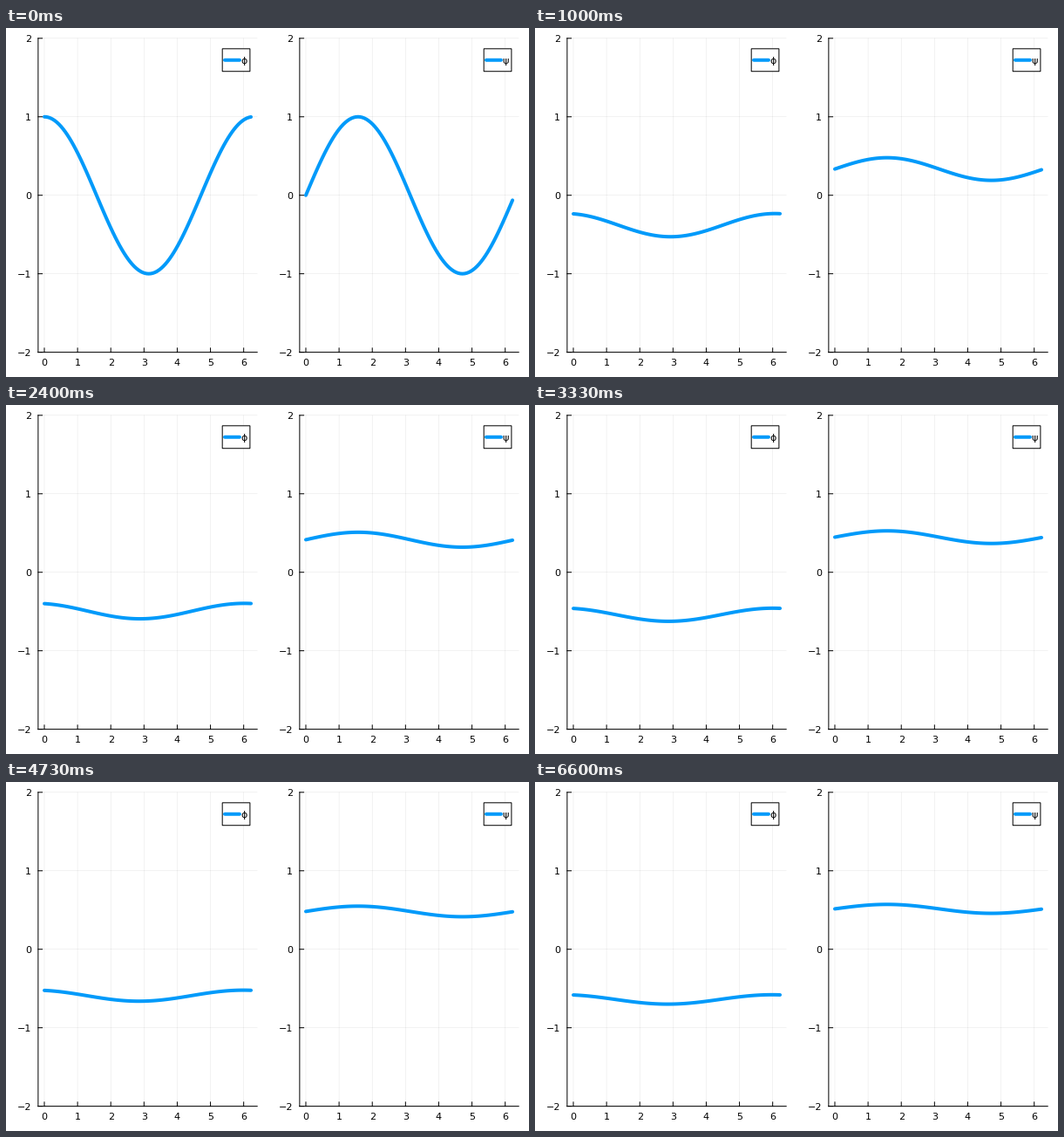
A matplotlib script for the animation above (6670 ms loop, 600 by 400 pixels).

```python
import numpy as np
import matplotlib.pyplot as plt
from matplotlib.animation import FuncAnimation
from matplotlib.patches import Rectangle

W, H, DPI = 600, 400, 100
PT = 72 / DPI  # points per pixel
FRAMES, LOOP_MS = 100, 6670
BLUE = "#009AFA"
TOP, BOTTOM, PANEL_W = 11.81, 371.61, 251.32
TICK = 4.72

plt.rcParams["font.family"] = "DejaVu Sans"
fig = plt.figure(figsize=(W / DPI, H / DPI), dpi=DPI, facecolor="white")
ax = fig.add_axes([0, 0, 1, 1])
ax.set_xlim(0, W)
ax.set_ylim(H, 0)
ax.axis("off")

x = np.arange(100) * 2 * np.pi / 100
PAD = 0.03 * x[-1]


def px(left, v):
    return left + PANEL_W * (v + PAD) / (x[-1] + 2 * PAD)


def py(v):
    return BOTTOM + (TOP - BOTTOM) * (v + 2) / 4


def line(xs, ys, width=1, **kw):
    kw.setdefault("color", "black")
    return ax.plot(xs, ys, lw=width * PT, snap=False, **kw)[0]


def label(tx, ty, s, ha):
    ax.text(tx, ty, s, fontsize=8, ha=ha, va="baseline")


def panel(left, name):
    """Draw axes, grid and legend; return the empty curve."""
    right = left + PANEL_W
    grid = dict(width=0.5, alpha=0.1, zorder=1)
    for v in range(7):
        gx = px(left, v)
        line([gx, gx], [TOP, BOTTOM], **grid)
        line([gx, gx], [BOTTOM, BOTTOM - TICK])
        label(gx, 387, str(v), "center")
    for v in range(-2, 3):
        gy = py(v)
        line([left, right], [gy, gy], **grid)
        line([left, left + TICK], [gy, gy])
        label(left - 8, gy + 4.2, str(v).replace("-", "\u2212"), "right")
    line([left, left], [TOP, BOTTOM])
    line([left, right], [BOTTOM, BOTTOM])

    ax.add_patch(Rectangle((right - 40, 23.8), 31.7, 25.92, fc="white",
                           ec="black", lw=PT, snap=False, zorder=4))
    line([right - 37.2, right - 20.2], [36.76, 36.76], 4, color=BLUE,
         solid_capstyle="round", zorder=5)
    ax.text(right - 18.4, 40.9, name, fontsize=8, va="baseline", zorder=6)
    return line([], [], 4, color=BLUE, solid_capstyle="round",
                solid_joinstyle="round", zorder=3)


LEFTS = (36.87, 336.87)
curves = [panel(left, name) for left, name in zip(LEFTS, "\u03d5\u03c8")]


def fields(n):
    """Amplitude falls as an inverse root while the means drift like a log."""
    growth = 1 + np.pi * n
    amp, drift = growth ** -0.5, np.log(growth)
    shear = 0.39 * (1 - amp) ** 3.7
    phi = -0.15 * drift + 0.234 * (1 - amp) + amp * (np.cos(x) - shear * np.sin(x))
    psi = 0.1 * drift - 0.062 * (1 - amp) + amp * np.sin(x)
    return phi, psi


def update(n):
    for curve, left, values in zip(curves, LEFTS, fields(n)):
        curve.set_data(px(left, x), py(values))
    return curves


anim = FuncAnimation(fig, update, frames=FRAMES, interval=LOOP_MS / FRAMES,
                     init_func=lambda: update(0), repeat=True, repeat_delay=0)
plt.show()
```
